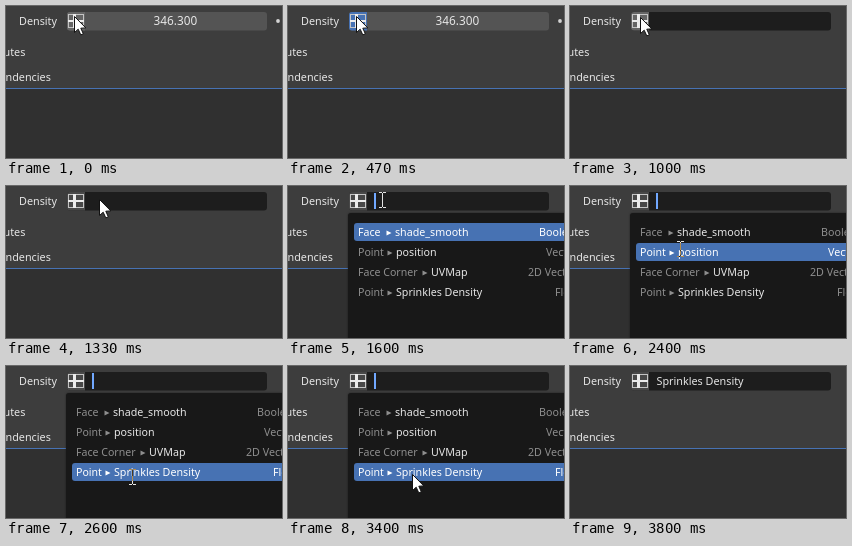
Recreate the animation shown at these times as an HTML page with a canvas. Size 276 by 152 pixels, loop 4390 ms.

```html
<!DOCTYPE html>
<html lang="en">
<head>
<meta charset="utf-8">
<title>Density field</title>
<style>
  html, body { margin: 0; width: 100%; height: 100%; overflow: hidden; background: #3d3d3d; }
  canvas { display: block; width: 100vw; height: 100vh; }
</style>
</head>
<body>
<canvas id="stage" width="276" height="152"></canvas>
<script>
const ctx = document.getElementById('stage').getContext('2d');
const LOOP = 4390, TICK = 1000 / 15;
const BLUE = '#4772b3', TEXT = '#e6e6e6', DIM = '#8e8e8e';

// Ticks at which the interface changes
const PRESS = 7, FIELD = 10, LEAVE = 15, OPEN = 24, SCAN = 32, NUDGE = 46, PICK = 51, CLOSE = 52, EXIT = 56, GONE = 57;

const rows = [
  { domain: 'Face', name: 'shade_smooth', x: 107, type: 'Boolean', typeX: 251 },
  { domain: 'Point', name: 'position', x: 108, type: 'Vector', typeX: 258 },
  { domain: 'Face Corner', name: 'UVMap', x: 143, type: '2D Vector', typeX: 240 },
  { domain: 'Point', name: 'Sprinkles Density', x: 108, type: 'Float', typeX: 267 }
];

const progress = (tick, start, steps) => Math.max(0, Math.min(1, (tick - start + 1) / steps));
const lerp = (a, b, p) => Math.round(a + (b - a) * p);

function rect(x, y, w, h, color) {
  ctx.fillStyle = color;
  ctx.fillRect(x, y, w, h);
}

function rounded(x, y, w, h, radii, color) {
  ctx.fillStyle = color;
  ctx.beginPath();
  ctx.roundRect(x, y, w, h, radii);
  ctx.fill();
}

function label(text, x, y, color = TEXT, size = 10.8) {
  ctx.font = `${size}px "Noto Sans", "Open Sans", sans-serif`;
  ctx.fillStyle = color;
  ctx.fillText(text, x, y);
}

function polygon(points) {
  ctx.beginPath();
  points.forEach(([x, y]) => ctx.lineTo(x, y));
  ctx.closePath();
}

function drawPanel() {
  rect(0, 0, 276, 152, '#3d3d3d');
  rect(0, 82, 276, 70, '#303030');
  rect(0, 82, 276, 1, BLUE);
  label('Density', 13, 19);
  label('utes', -2.5, 50);
  label('ndencies', -0.5, 75);
}

function drawTableIcon() {
  ctx.strokeStyle = '#c4c4c4';
  ctx.lineWidth = 1;
  ctx.strokeRect(62.5, 8.5, 15, 13);
  rect(67, 8, 3, 14, '#ececec');
  rect(62, 14, 16, 2, '#ececec');
}

function drawField(tick) {
  const editing = tick >= FIELD;
  rounded(61, 6, 200, 18.5, 3, editing ? '#1d1d1d' : '#545454');
  const hover = tick < LEAVE + 3;
  const pressed = tick >= PRESS && tick < FIELD;
  rounded(61, 6, 18, 18.5, [3, 0, 0, 3], pressed ? BLUE : hover ? '#656565' : '#484848');
  drawTableIcon();
  if (!editing) {
    label('346.300', 147.5, 19, TEXT, 11.8);
    ctx.fillStyle = '#d4d4d4';
    ctx.beginPath();
    ctx.arc(272, 15, 1.9, 0, 7);
    ctx.fill();
  }
  if (tick >= OPEN && tick < CLOSE) rect(86, 7, 2, 16, '#71a8ff');
  if (tick >= CLOSE) label('Sprinkles Density', 86.5, 19);
}

function drawPopup(selected) {
  ctx.save();
  ctx.shadowColor = 'rgba(0,0,0,.5)';
  ctx.shadowBlur = 2;
  rounded(60, 27, 230, 140, 3, '#181818');
  ctx.restore();
  rows.forEach((row, i) => {
    const active = i === selected, base = 50 + i * 20;
    if (active) rounded(66, base - 13, 220, 18, 3, BLUE);
    const side = active ? '#fff' : DIM;
    label(row.domain, 70, base, side, 10.6);
    label(row.name, row.x, base, active ? '#fff' : TEXT, 10.7);
    label(row.type, row.typeX, base, side, 10.7);
    ctx.fillStyle = side;
    polygon([[row.x - 8.5, base - 5.5], [row.x - 3.5, base - 3], [row.x - 8.5, base - 0.5]]);
    ctx.fill();
  });
}

function drawArrow(x, y) {
  ctx.save();
  ctx.translate(x + 0.5, y + 0.5);
  polygon([[0, 0], [0, 16], [3.7, 12.7], [6.3, 18.4], [8.8, 17.3], [6.3, 11.7], [11.3, 11.4]]);
  ctx.fillStyle = '#fff';
  ctx.fill();
  ctx.strokeStyle = '#111';
  ctx.lineWidth = 1;
  ctx.stroke();
  ctx.restore();
}

// The text pointer inverts whatever lies beneath it.
function drawBeam(x, y) {
  ctx.save();
  ctx.globalCompositeOperation = 'difference';
  rect(x, y - 7, 1, 14, '#fff');
  for (const edge of [y - 8, y + 7]) {
    rect(x - 3, edge, 3, 1, '#fff');
    rect(x + 1, edge, 3, 1, '#fff');
  }
  ctx.restore();
}

function beamAt(tick) {
  const p = progress(tick, SCAN, 8) ** 1.45;
  return [lerp(94, 126, p), tick >= NUDGE ? 109 : lerp(14, 111, p)];
}

function drawPointer(tick) {
  if (tick >= GONE) return;
  if (tick >= EXIT) return drawArrow(111, 139);
  if (tick >= PICK) return drawArrow(124, 108);
  if (tick >= OPEN) return drawBeam(...beamAt(tick));
  const p = progress(tick, LEAVE, 6);
  drawArrow(lerp(68, 93, p * p * (3 - 2 * p)), lerp(10, 13, 1 - (1 - p) ** 3));
}

function render(now) {
  const tick = Math.floor((now % LOOP + 5) / TICK);
  drawPanel();
  drawField(tick);
  if (tick >= OPEN && tick < CLOSE) {
    const row = Math.floor((beamAt(tick)[1] - 36) / 20);
    drawPopup(Math.max(0, Math.min(3, row)));
  }
  drawPointer(tick);
}

const start = performance.now();
function loop() {
  render(performance.now() - start);
  requestAnimationFrame(loop);
}
loop();
</script>
</body>
</html>
```
